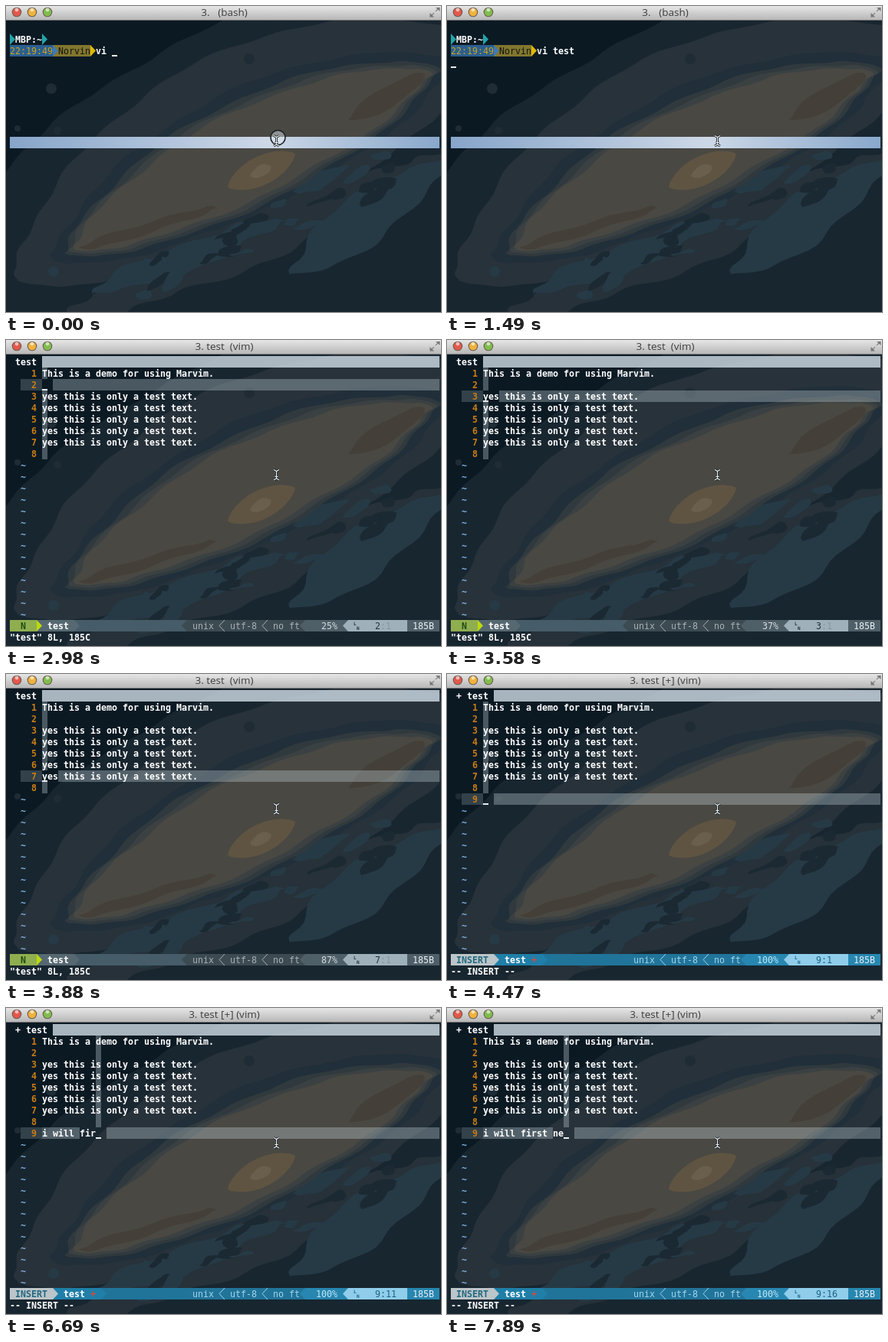
Recreate the animation shown at these times as an HTML page with a canvas. Size 567 by 400 pixels, loop 8 s.

```html
<!DOCTYPE html>
<html>
<head>
<meta charset="utf-8">
<style>
  html, body { margin: 0; width: 567px; height: 400px; overflow: hidden; background: #0b1923; }
  canvas { display: block; }
</style>
</head>
<body>
<canvas id="stage" width="567" height="400"></canvas>
<script>
const LOOP = 8000, CELL = 7, ROW = 15;
const MONO = '11.63px "DejaVu Sans Mono", monospace';
const stage = document.getElementById('stage');
const sky = document.createElement('canvas');
sky.width = 567;
sky.height = 400;
let ctx = sky.getContext('2d');

const X = col => 5 + col * CELL;
const Y = row => 21 + row * ROW;

// Typing: [ms, characters shown from then on]
const command = 'test', commandKeys = [[0, 0], [600, 1], [740, 2], [1040, 3], [1190, 4]];
const sentence = 'i will first ne';
const sentenceKeys = [[4470, 0], [5210, 2], [5950, 4], [6100, 6], [6250, 7], [6550, 8],
  [6690, 10], [6990, 11], [7290, 12], [7590, 13], [7890, 15]];
const typed = (text, keys, t) => text.slice(0, keys.filter(([ms]) => ms <= t).pop()[1]);

function cursorLine(t) {
  if (t < 2980) return 1;
  if (t < 3580) return 2;
  if (t < 4320) return 3 + 2 * Math.min(2, Math.floor((t - 3580) / 150));
  return t < 4470 ? 8 : 9;
}

const lines = ['This is a demo for using Marvim.', '', ...Array(5).fill('yes this is only a test text.'), ''];

const normalTheme = {
  mode: ' N ', modeBg: '#8fae4f', modeInk: '#1d4d12', tip: '#bcd90c', file: '#566871', mid: '#465c68',
  info: '#3c4a52', ink: '#a9b1b5', pct: '#4f5f68', pctInk: '#d5dbde', pos: '#9fb0bb', posInk: '#26343c', faint: '#87959d'
};
const insertTheme = {
  mode: ' INSERT ', modeBg: '#bcc5c9', modeInk: '#22687f', tip: '#bcc5c9', file: '#1f7fa8', mid: '#20749a',
  info: '#21749a', ink: '#a2d5ec', pct: '#2787b0', pctInk: '#c2e8f8', pos: '#8fcdeb', posInk: '#1c6484', faint: '#1c6484'
};

function box(x, y, w, h, color) {
  ctx.fillStyle = color;
  ctx.fillRect(x, y, w, h);
}
const cells = (from, to, row, color) => box(X(from), Y(row), (to - from) * CELL, ROW, color);

function put(text, col, row, color = '#fff', weight = 'bold') {
  ctx.font = weight + ' ' + MONO;
  ctx.textAlign = 'left';
  ctx.fillStyle = color;
  ctx.fillText(text, X(col), Y(row) + 12);
}

function path(points, color, fill, width = 1) {
  ctx.beginPath();
  points.forEach(([x, y]) => ctx.lineTo(x, y));
  if (fill) {
    ctx.fillStyle = color;
    ctx.fill();
  } else {
    ctx.strokeStyle = color;
    ctx.lineWidth = width;
    ctx.stroke();
  }
}

// Powerline wedge filling one cell
function wedge(col, row, color, left, outline) {
  const base = X(col + (left ? 1 : 0)), tip = X(col + (left ? 0 : 1)), y = Y(row);
  path([[base, y], [tip, y + ROW / 2], [base, y + ROW]], color, !outline);
}

function disc(x, y, r, color) {
  ctx.beginPath();
  ctx.arc(x, y, r, 0, 7);
  ctx.fillStyle = color;
  ctx.fill();
}

const underline = (col, row) => box(X(col), Y(row) + 13, CELL, 2, '#e8eef0');

// Tilted lens with a wavy edge; bow bends its middle sideways
function lens(color, x, y, length, width, bow = 0, rough = 1.5, tilt = -26.5) {
  const turn = tilt * Math.PI / 180, points = [];
  const steps = Math.max(24, Math.round(length / 2));
  for (let i = 0; i < steps; i++) {
    const a = i / steps * 2 * Math.PI;
    const u = Math.cos(a), room = 1 - u * u;
    const wave = rough * (Math.sin(i * .9 + x) + Math.sin(i * .37 + y));
    const along = u * length + wave;
    const across = Math.sign(Math.sin(a)) * width * room ** .75 + bow * room + wave;
    points.push([x + along * Math.cos(turn) - across * Math.sin(turn),
      y + along * Math.sin(turn) + across * Math.cos(turn)]);
  }
  path(points, color, true);
}

function paintSky() {
  let seed = 7;
  const random = () => (seed = seed * 16807 % 2147483647) / 2147483647;

  box(0, 0, 567, 400, '#0b1923');
  lens('#182630', 320, 202, 430, 400, 220);
  lens('#28323a', 320, 202, 345, 117, -29);
  lens('#202f39', 320, 202, 290, 80, -14);

  // Dust lanes below the disc
  lens('#263139', 330, 302, 280, 32, 0, 3, -23);
  lens('#263a46', 470, 277, 125, 32, 0, 3, -36);
  lens('#263a46', 235, 328, 135, 18, 0, 3, -21);
  for (let i = 0; i < 26; i++) {
    const x = 180 + random() * 340;
    const y = 352 - (x - 180) * .42 + random() * 60 - 30;
    lens(random() < .5 ? '#263a46' : '#1b2932', x, y, 6 + random() * 20, 3 + random() * 5, 0, 1, -40 + random() * 30);
  }
  lens('#263a46', 410, 226, 40, 9);
  disc(62, 347, 7, '#263a46');
  for (const [x, y, r] of [[59, 108, 7], [15, 160, 4], [67, 163, 5], [317, 69, 7]]) disc(x, y, r, '#1f2c35');

  // Disc and core
  lens('#30393d', 320, 202, 272, 69, -11);
  lens('#3b4142', 320, 202, 266, 63, -10);
  lens('#494842', 320, 202, 260, 57, -10);
  lens('#443f38', 496, 119, 58, 14, 0, 1.5, -32);
  lens('#443f38', 185, 290, 92, 8, 0, 1.5, -17);
  lens('#5f5442', 333, 215, 49, 19, 0, 0);
  lens('#6a5f4d', 332, 216, 15, 8, 0, .5);
}

function titleBar(title) {
  const shine = ctx.createLinearGradient(0, 0, 0, 19);
  shine.addColorStop(0, '#e6e6e6');
  shine.addColorStop(1, '#b5b5b5');
  box(0, 0, 567, 19, shine);
  box(0, 18, 567, 1, '#777');
  ['#e4574c', '#efb23c', '#80bd4d'].forEach((color, i) => {
    const x = 14 + i * 20;
    disc(x, 8, 6.3, '#6d5c50');
    disc(x, 8, 5.2, color);
    disc(x, 5, 2.4, '#ffffff99');
  });
  ctx.font = '13.5px "Open Sans", sans-serif';
  ctx.textAlign = 'center';
  ctx.fillStyle = '#3c3c3c';
  ctx.fillText(title, 284.5, 13);
  path([[553, 14], [565, 2]], '#888', false, 1.5);
  path([[560, 2], [565.5, 2], [565.5, 7]], '#777', true);
  path([[552.5, 9], [552.5, 14.5], [558, 14.5]], '#777', true);
  disc(559, 8, 1.8, '#cfcfcf');
}

function pointer() {
  const beam = (color, width) => {
    path([[349, 169.5], [352.5, 171.5], [356, 169.5]], color, false, width);
    path([[352.5, 171], [352.5, 181]], color, false, width);
    path([[349, 183], [352.5, 181], [356, 183]], color, false, width);
    path([[350.5, 178.5], [354.5, 178.5]], color, false, width);
  };
  beam('#1b242a', 3);
  beam('#e8ecee', 1.2);
}

function shell(t) {
  wedge(0, 1, '#20a5a8');
  put('MBP:~', 1, 1);
  wedge(6, 1, '#20a5a8');
  cells(0, 8, 2, '#2c5f90');
  put('22:19:49', 0, 2, '#c9a51c', 'normal');
  cells(8, 15, 2, '#81762f');
  wedge(8, 2, '#3f79b7');
  put('Norvin', 9, 2, '#10140e', 'normal');
  wedge(15, 2, '#dfb800');
  const text = typed(command, commandKeys, t);
  put('vi ' + text, 16, 2);
  if (t < 1490) underline(19 + text.length, 2);
  else underline(0, 3);

  const glow = ctx.createLinearGradient(5, 0, 565, 0);
  glow.addColorStop(0, '#87a5c9');
  glow.addColorStop(.6, '#cdd8e7');
  glow.addColorStop(1, '#89a8cb');
  cells(0, 80, 10, glow);
  if (t < 150) {
    ctx.beginPath();
    ctx.arc(354.5, 172, 9.5, 0, 7);
    ctx.fillStyle = '#e4e9ef77';
    ctx.fill();
    ctx.strokeStyle = '#1a2026';
    ctx.lineWidth = 1.6;
    ctx.stroke();
  }
}

function statusLine(insert, line, col) {
  const c = insert ? insertTheme : normalTheme, r = 23;
  const modeEnd = insert ? 8 : 5, fileEnd = insert ? 17 : 12;
  cells(fileEnd, 33, r, c.mid);
  cells(modeEnd, fileEnd, r, c.file);
  wedge(fileEnd, r, c.file);
  cells(0, modeEnd, r, c.modeBg);
  wedge(modeEnd, r, c.tip);
  put(c.mode, insert ? 0 : 1, r, c.modeInk);
  put('test', modeEnd + 2, r);
  if (insert) put('+', 15, r, '#d8483c');

  cells(33, 55, r, c.info);
  wedge(32, r, c.info, true);
  put('unix', 34, r, c.ink, 'normal');
  put('utf-8', 41, r, c.ink, 'normal');
  put('no ft', 49, r, c.ink, 'normal');
  wedge(39, r, c.ink, true, true);
  wedge(47, r, c.ink, true, true);
  cells(55, 63, r, c.pct);
  wedge(54, r, c.pct, true);
  const percent = insert ? 100 : Math.floor(line / 8 * 100);
  put((percent + '%').padStart(4), 57, r, c.pctInk, 'normal');
  cells(63, 74, r, c.pos);
  wedge(62, r, c.pos, true);
  ctx.font = 'bold 6px "DejaVu Sans Mono", monospace';
  ctx.fillStyle = c.posInk;
  ctx.fillText('L', 453, 373);
  ctx.fillText('N', 457, 379);
  put(String(line), 68, r, c.posInk, 'normal');
  put(':' + col, 69, r, c.faint, 'normal');
  cells(74, 80, r, c.pct);
  put('185B', 75, r, '#e9f0f3', 'normal');
}

function editor(t) {
  const insert = t >= 4470;
  const text = insert ? typed(sentence, sentenceKeys, t) : '';
  const line = cursorLine(t);
  const buffer = insert ? [...lines, text] : lines;
  const col = text.length;

  // Tab line
  put(insert ? '+ test' : 'test', 1, 0);
  cells(insert ? 8 : 6, 80, 0, 'rgba(208,221,230,.8)');

  // Cursor column and cursor line, leaving the current word unlit
  const lit = 'rgba(205,222,228,.32)';
  box(X(6 + col), Y(1), CELL, (line - 1) * ROW, lit);
  if (!insert) box(X(6 + col), Y(line + 1), CELL, (8 - line) * ROW, lit);
  const wordStart = insert ? col - text.match(/\S*$/)[0].length : 0;
  const wordEnd = insert ? col + 2 : buffer[line - 1].split(' ')[0].length || 2;
  cells(2, 6, line, 'rgba(205,222,228,.2)');
  cells(6, 6 + wordStart, line, lit);
  cells(6 + wordEnd, 80, line, lit);

  buffer.forEach((content, i) => {
    put(String(i + 1), 4, i + 1, '#c87d16');
    put(content, 6, i + 1);
  });
  for (let row = buffer.length + 1; row < 23; row++) put('~', 2, row, '#7fb0de');
  if (t < 4920 || t >= 5210) underline(6 + col, line);

  statusLine(insert, line, col + 1);
  put(insert ? '-- INSERT --' : '"test" 8L, 185C', 0, 24);
}

function titleAt(t) {
  if (t < 1940) return '3.\u00a0\u00a0 (bash)';
  if (t < 2380) return '3. test\u00a0 (bash)';
  return t < 4470 ? '3. test\u00a0 (vim)' : '3. test [+] (vim)';
}

function draw(t) {
  ctx.drawImage(sky, 0, 0);
  titleBar(titleAt(t));
  if (t < 1940) shell(t);
  else editor(t);
  pointer();
}

paintSky();
ctx = stage.getContext('2d');
const start = performance.now();
function tick() {
  draw((performance.now() - start) % LOOP);
  requestAnimationFrame(tick);
}
tick();
</script>
</body>
</html>
```
